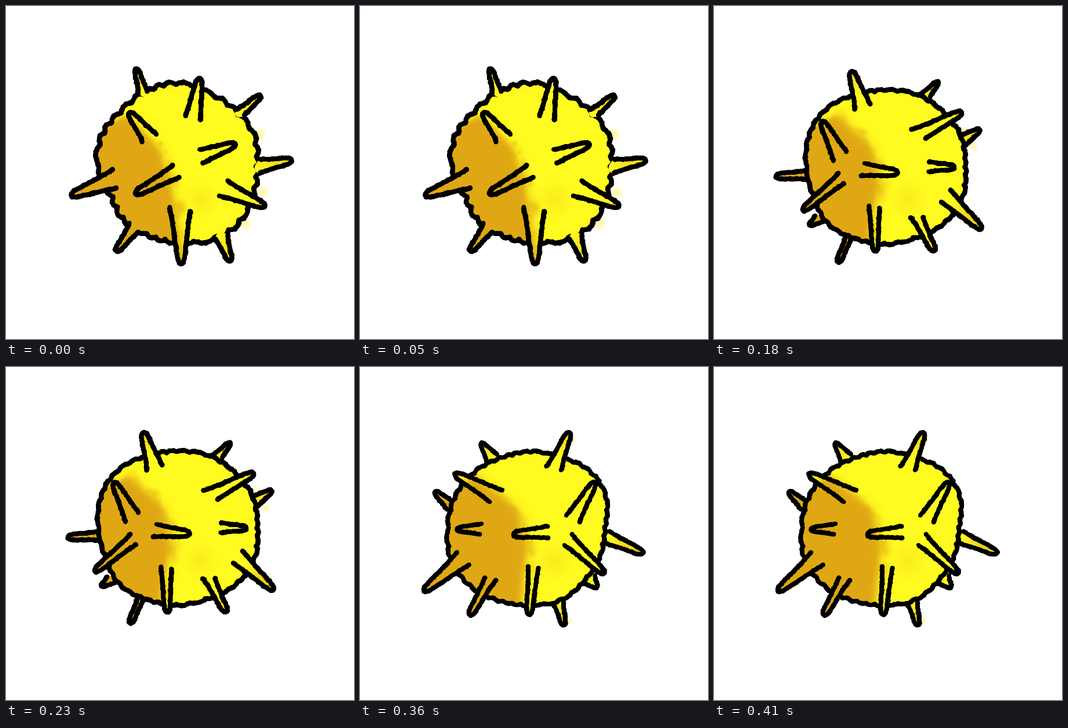
An HTML page with a canvas for the animation above (450 ms loop, 600x576 px).

```html
<!DOCTYPE html>
<html lang="en">
<head>
<meta charset="utf-8">
<title>Spiky ball</title>
<style>
html, body { margin: 0; width: 100%; height: 100%; overflow: hidden; background: #fff; }
canvas { display: block; }
</style>
</head>
<body>
<canvas id="stage" width="600" height="576"></canvas>
<script>
const W = 600, H = 576, CX = 296, CY = 278, STEP = 90;
const TAU = Math.PI * 2;

// Each spike is: base x, y, tip x, y, other base x, y.
// radii run clockwise from the right; shade holds the x of the shadow's edge from top to bottom.
const tumbleA = {
  ink: '#000', width: 9, bumps: 34, height: 2.6, tint: 0.35,
  radii: [138, 140, 144, 139, 132, 130, 132, 126, 139, 142, 138, 142, 145, 139, 140, 143],
  shade: [207, 263, 285, 299, 314],
  spills: [[437, 222, 14], [443, 322, 13], [412, 376, 14]],
  back: [],
  front: [
    [228, 150, 223, 103, 245, 150], [309, 190, 335, 119, 336, 198],
    [396, 180, 443, 151, 410, 191], [235, 234, 209, 180, 260, 222],
    [334, 248, 401, 237, 340, 272], [438, 265, 498, 266, 435, 290],
    [383, 303, 452, 349, 366, 328], [287, 276, 218, 328, 300, 296],
    [184, 283, 107, 330, 192, 315], [213, 376, 187, 429, 229, 390],
    [282, 348, 302, 452, 318, 355], [360, 402, 389, 447, 382, 396]
  ]
};
const tumbleB = {
  ink: '#000', width: 9.5, bumps: 32, height: 2.4, tint: 0.6,
  radii: [140, 146, 145, 140, 138, 142, 137, 142, 138, 140, 138, 130, 126, 132, 139, 138],
  shade: [222, 264, 289, 306, 322],
  spills: [[424, 215, 12], [404, 190, 10]],
  back: [[165, 228, 129, 198, 178, 212], [430, 356, 479, 373, 437, 333]],
  front: [
    [313, 152, 331, 98, 331, 150], [247, 212, 229, 136, 275, 202],
    [405, 196, 450, 154, 416, 215], [308, 242, 354, 193, 331, 258],
    [233, 268, 167, 265, 220, 292], [380, 258, 464, 251, 383, 289],
    [284, 294, 268, 378, 310, 306], [330, 357, 409, 421, 362, 340],
    [208, 364, 187, 435, 237, 382], [291, 414, 305, 479, 316, 414]
  ]
};
const tumbleC = {
  ink: '#000', width: 8.8, bumps: 42, height: 1.3, tint: 0.5,
  radii: [138, 143, 140, 134, 134, 135, 140, 135, 137, 143, 143, 135, 133, 136, 137, 140],
  shade: [212, 272, 284, 266, 262],
  spills: [[434, 219, 13], [448, 244, 9]],
  back: [
    [355, 153, 390, 127, 372, 158], [421, 225, 463, 211, 430, 245],
    [160, 284, 101, 295, 162, 300], [175, 362, 160, 382, 192, 372],
    [228, 395, 212, 448, 238, 402]
  ],
  front: [
    [243, 178, 235, 108, 270, 170], [341, 214, 432, 181, 363, 231],
    [206, 268, 184, 195, 230, 253], [372, 269, 420, 279, 370, 287],
    [260, 272, 322, 289, 254, 294], [215, 289, 149, 357, 226, 306],
    [408, 318, 465, 389, 390, 338], [267, 345, 278, 430, 286, 348],
    [340, 366, 382, 429, 360, 364]
  ]
};
const tumbleD = {
  ink: '#1d201e', width: 11.5, bumps: 42, height: 3.4, tint: 0.6,
  radii: [127, 125, 122, 136, 132, 136, 148, 146, 146, 138, 136, 130, 135, 137, 133, 136],
  shade: [225, 270, 294, 304, 322],
  spills: [[436, 282, 8], [402, 190, 12]],
  back: [
    [345, 152, 369, 122, 368, 158], [150, 302, 113, 310, 150, 318],
    [347, 402, 361, 424, 366, 400]
  ],
  front: [
    [228, 175, 240, 97, 260, 165], [280, 228, 334, 166, 309, 249],
    [395, 192, 460, 192, 395, 234], [178, 243, 108, 204, 192, 215],
    [248, 257, 171, 293, 257, 296], [280, 298, 333, 369, 312, 289],
    [388, 281, 458, 317, 353, 291], [172, 353, 105, 389, 185, 378],
    [243, 338, 201, 426, 257, 348], [370, 378, 444, 400, 382, 355],
    [292, 400, 307, 471, 313, 400]
  ]
};
const tumbleE = {
  ink: '#000', width: 8.4, bumps: 42, height: 1.4, tint: 0.5,
  radii: [127, 128, 129, 135, 134, 138, 146, 150, 145, 143, 138, 132, 132, 132, 140, 139],
  shade: [198, 270, 288, 278, 272],
  spills: [[365, 124, 8], [361, 439, 7]],
  back: [
    [218, 162, 206, 127, 238, 152], [150, 247, 125, 212, 165, 235],
    [425, 306, 493, 324, 428, 283], [405, 360, 412, 386, 380, 372],
    [333, 408, 353, 452, 350, 398]
  ],
  front: [
    [322, 172, 363, 108, 347, 179], [223, 233, 159, 182, 248, 214],
    [356, 256, 407, 195, 378, 270], [209, 271, 162, 281, 209, 290],
    [323, 275, 259, 290, 325, 296], [366, 290, 425, 361, 352, 308],
    [168, 320, 106, 391, 189, 342], [215, 364, 187, 434, 235, 367],
    [290, 346, 291, 434, 308, 347]
  ]
};

function seeded(seed) {
  return () => {
    seed = (seed * 16807) % 2147483647;
    return seed / 2147483647;
  };
}

function layer() {
  const canvas = document.createElement('canvas');
  canvas.width = W;
  canvas.height = H;
  return canvas;
}

function blot(g, x, y, r, rgb, alpha) {
  const soft = g.createRadialGradient(x, y, 0, x, y, r);
  soft.addColorStop(0, `rgba(${rgb},${alpha})`);
  soft.addColorStop(1, `rgba(${rgb},0)`);
  g.fillStyle = soft;
  g.fillRect(x - r, y - r, 2 * r, 2 * r);
}

function makePaint(pose, random) {
  const canvas = layer(), g = canvas.getContext('2d');
  g.fillStyle = '#fffa20';
  g.fillRect(0, 0, W, H);

  const rim = g.createRadialGradient(CX, CY, 132, CX, CY, 168);
  rim.addColorStop(0, 'rgba(222,170,24,0)');
  rim.addColorStop(1, `rgba(222,170,24,${pose.tint})`);
  g.fillStyle = rim;
  g.fillRect(0, 0, W, H);

  const heights = [190, 245, 310, 400, 480];
  const shadow = (shift, blur, color) => {
    g.filter = `blur(${blur}px)`;
    g.fillStyle = color;
    g.beginPath();
    g.moveTo(60, 215);
    g.lineTo(165, 212);
    pose.shade.forEach((x, i) => g.lineTo(x + shift, heights[i]));
    g.lineTo(60, 500);
    g.fill();
    g.filter = 'none';
  };
  shadow(7, 8, 'rgba(232,184,22,.5)');
  shadow(-2, 4, '#dfa714');

  // Watery brush marks along the shadow's edge
  for (let i = 0; i < 45; i++) {
    const k = random() * 3, n = Math.floor(k), f = k - n;
    const x = pose.shade[n] * (1 - f) + pose.shade[n + 1] * f;
    const y = heights[n] * (1 - f) + heights[n + 1] * f;
    blot(g, x + random() * 24 - 12, y + random() * 12 - 6, 5 + random() * 11, '226,174,20', 0.3);
  }
  blot(g, 335, 335, 34, '236,200,24', 0.3);
  return canvas;
}

function outline({ radii, bumps, height }) {
  const n = radii.length, points = [];
  for (let i = 0; i <= 480; i++) {
    const k = (i / 480) * n, j = Math.floor(k), f = k - j;
    const [p, q, r, s] = [-1, 0, 1, 2].map(d => radii[(j + d + n) % n]);
    const base = q + f * (r - p + f * (2 * p - 5 * q + 4 * r - s + f * (3 * (q - r) + s - p))) / 2;
    const a = (i / 480) * TAU;
    const wave = Math.abs(Math.sin(a * bumps / 2 + 1.2 * Math.sin(3 * a) + 0.7 * Math.sin(7 * a)));
    const rad = base + height * (2 * wave - 1.27);
    points.push([CX + rad * Math.cos(a), CY + rad * Math.sin(a)]);
  }
  return points;
}

function spikeShape([ax, ay, tx, ty, bx, by], width) {
  const mx = (ax + bx) / 2, my = (ay + by) / 2;
  const len = Math.hypot(tx - mx, ty - my);
  const ux = (tx - mx) / len, uy = (ty - my) / len;
  const inset = width * 0.65;
  const tip = [tx - ux * inset, ty - uy * inset];
  const side = Math.sign((ax - mx) * -uy + (ay - my) * ux);
  const spread = Math.min(9, len * 0.14);

  const edge = (x, y, dir) => {
    const c1 = [x + (tip[0] - x) * 0.6, y + (tip[1] - y) * 0.6];
    const c2 = [tip[0] - uy * dir * spread, tip[1] + ux * dir * spread];
    const points = [];
    for (let i = 0; i <= 24; i++) {
      const t = i / 24, s = 1 - t;
      points.push([0, 1].map(d => s * s * s * [x, y][d] + 3 * s * s * t * c1[d]
        + 3 * s * t * t * c2[d] + t * t * t * tip[d]));
    }
    return points;
  };
  return {
    points: [...edge(ax, ay, side), ...edge(bx, by, -side).reverse()],
    root: [mx - ux * 16, my - uy * 16]
  };
}

function trace(g, points) {
  g.beginPath();
  points.forEach(([x, y]) => g.lineTo(x, y));
}

// A solid line with a ragged, hand-inked edge
function inkLine(g, points, { ink, width }, random) {
  g.strokeStyle = g.fillStyle = ink;
  g.lineWidth = width - 1.2;
  g.lineJoin = 'round';
  g.lineCap = 'butt';
  trace(g, points);
  g.stroke();
  let gap = 0;
  for (let i = 1; i < points.length; i++) {
    const [x0, y0] = points[i - 1], [x1, y1] = points[i];
    const len = Math.hypot(x1 - x0, y1 - y0);
    for (; gap < len; gap += 2.6) {
      const f = gap / len, r = width * (0.4 + 0.13 * random());
      g.beginPath();
      g.arc(x0 + (x1 - x0) * f + random() * 1.6 - 0.8,
        y0 + (y1 - y0) * f + random() * 1.6 - 0.8, r, 0, TAU);
      g.fill();
    }
    gap -= len;
  }
}

function render(pose, index) {
  const random = seeded(731 + index * 977);
  const canvas = layer(), g = canvas.getContext('2d');
  g.fillStyle = '#fff';
  g.fillRect(0, 0, W, H);
  pose.spills.forEach(([x, y, r]) => blot(g, x, y, r, '255,240,80', 0.6));
  const paint = g.createPattern(makePaint(pose, random), 'repeat');

  const drawSpike = spike => {
    const { points, root } = spikeShape(spike, pose.width);
    trace(g, points);
    g.quadraticCurveTo(...root, ...points[0]);
    g.fillStyle = paint;
    g.fill();
    inkLine(g, points, pose, random);
  };
  pose.back.forEach(drawSpike);
  const body = outline(pose);
  trace(g, body);
  g.fillStyle = paint;
  g.fill();
  inkLine(g, body, pose, random);
  pose.front.forEach(drawSpike);
  return canvas;
}

const pictures = [tumbleA, tumbleB, tumbleC, tumbleD, tumbleE].map(render);
const stage = document.getElementById('stage').getContext('2d');
const start = performance.now();

function draw() {
  const elapsed = performance.now() - start;
  stage.drawImage(pictures[Math.floor(elapsed / STEP) % pictures.length], 0, 0);
  requestAnimationFrame(draw);
}
draw();
</script>
</body>
</html>
```
